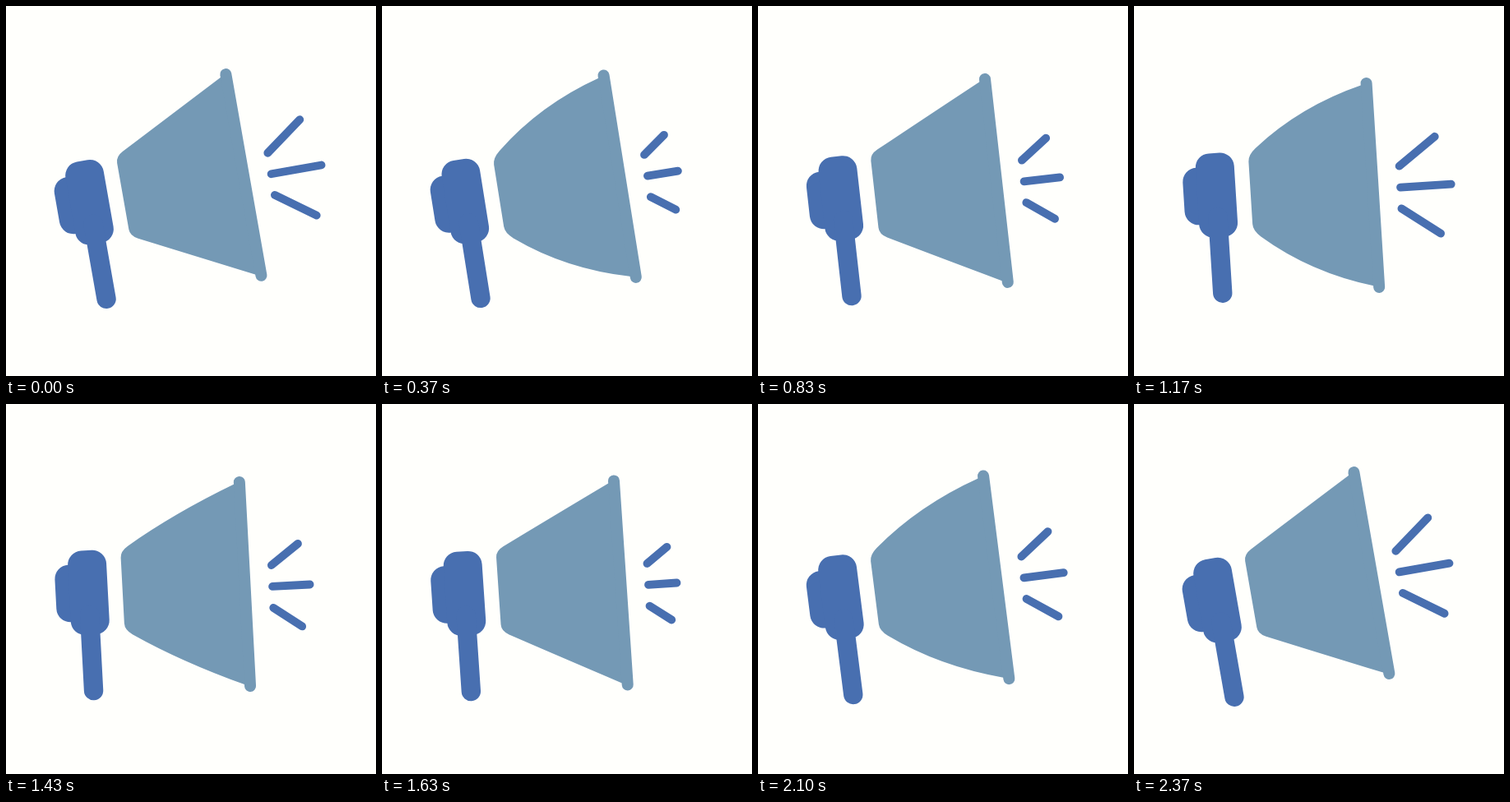
An HTML page for the animation above (2410 ms loop, 450 by 450 pixels).

```html
<!DOCTYPE html>
<html lang="en">
<head>
<meta charset="utf-8">
<title>Megaphone</title>
<style>
  html, body { margin: 0; width: 100%; height: 100%; overflow: hidden; background: #fffffc; }
  svg { display: block; width: 100%; height: 100%; }
  .dark { fill: #486fb0; }
  .light { fill: #7499b5; }
  .ray { stroke: #486fb0; stroke-width: 9.8; stroke-linecap: round; }
</style>
</head>
<body>
<svg viewBox="0 0 450 450">
  <g id="all">
    <g class="dark">
      <rect x="60.2" y="190.3" width="40" height="69.7" rx="17"/>
      <rect x="76.8" y="174" width="47" height="102.4" rx="17"/>
      <rect x="88.4" y="240" width="23.4" height="116.3" rx="11.7"/>
    </g>
    <path id="horn" class="light"/>
    <rect class="light" x="283.6" y="93.7" width="14" height="262.6" rx="7"/>
    <line class="ray"/>
    <line class="ray"/>
    <line class="ray"/>
  </g>
</svg>
<script>
const LOOP = 2410, TURN = 1260, BACK = 2375, PULSE = 1200, PUFF = 800;
const PIVOT = [178, 225], MID = 225;
const all = document.getElementById('all');
const horn = document.getElementById('horn');
const rays = [...document.querySelectorAll('.ray')];
// inner end, then the vector to the outer end at full length
const rayShape = [
  [324.2, 203.8, 45.5, -33.2],
  [324, 229.7, 62, 0],
  [323.8, 255.6, 45.8, 33.3]
];

const clamp = u => Math.min(1, Math.max(0, u));
const easeIn = u => Math.pow(clamp(u), 1.7);
const smooth = u => u * u * (3 - 2 * u);

function angle(t) {
  const low = -10, high = -2.75;
  return t < TURN
    ? low + (high - low) * easeIn(t / TURN)
    : high + (low - high) * easeIn((t - TURN) / (BACK - TURN));
}

function rayLength(t) {
  const u = (t % PULSE) / PULSE, dip = 0.45, min = 0.5;
  if (t >= 2 * PULSE) return 1;
  return u < dip
    ? min + (1 - min) * Math.pow(1 - u / dip, 1.35)
    : min + (1 - min) * smooth((u - dip) / (1 - dip));
}

function hornPath(bulge) {
  const left = 141.7, x0 = 151, x1 = 285;
  const y0 = 53.8, y1 = 122.4;         // distances from the axis
  const cx = x0 + (x1 - x0) * 0.43;
  const cy = y0 + (y1 - y0) * 0.43 + 2 * bulge;
  const slope = (cy - y0) / (cx - x0);
  const corner = y0 - slope * (x0 - left);
  const start = corner - 8;
  const up = y => (MID - y).toFixed(2), down = y => (MID + y).toFixed(2);
  return `M${left} ${up(start)}Q${left} ${up(corner)} ${x0} ${up(y0)}` +
    `Q${cx} ${up(cy)} ${x1} ${up(y1)}H291V${down(y1)}H${x1}` +
    `Q${cx} ${down(cy)} ${x0} ${down(y0)}` +
    `Q${left} ${down(corner)} ${left} ${down(start)}Z`;
}

function draw(t) {
  all.setAttribute('transform', `rotate(${angle(t)} ${PIVOT})`);
  const puff = Math.sin(Math.PI * Math.min(t, 3 * PUFF) / PUFF) ** 2;
  horn.setAttribute('d', hornPath(9.2 * puff));
  const k = rayLength(t);
  rays.forEach((ray, i) => {
    const [x, y, dx, dy] = rayShape[i];
    ray.setAttribute('x1', x);
    ray.setAttribute('y1', y);
    ray.setAttribute('x2', x + dx * k);
    ray.setAttribute('y2', y + dy * k);
  });
}

const begin = performance.now();
function tick(now) {
  draw(Math.max(0, now - begin) % LOOP);
  requestAnimationFrame(tick);
}
draw(0);
requestAnimationFrame(tick);
</script>
</body>
</html>
```
